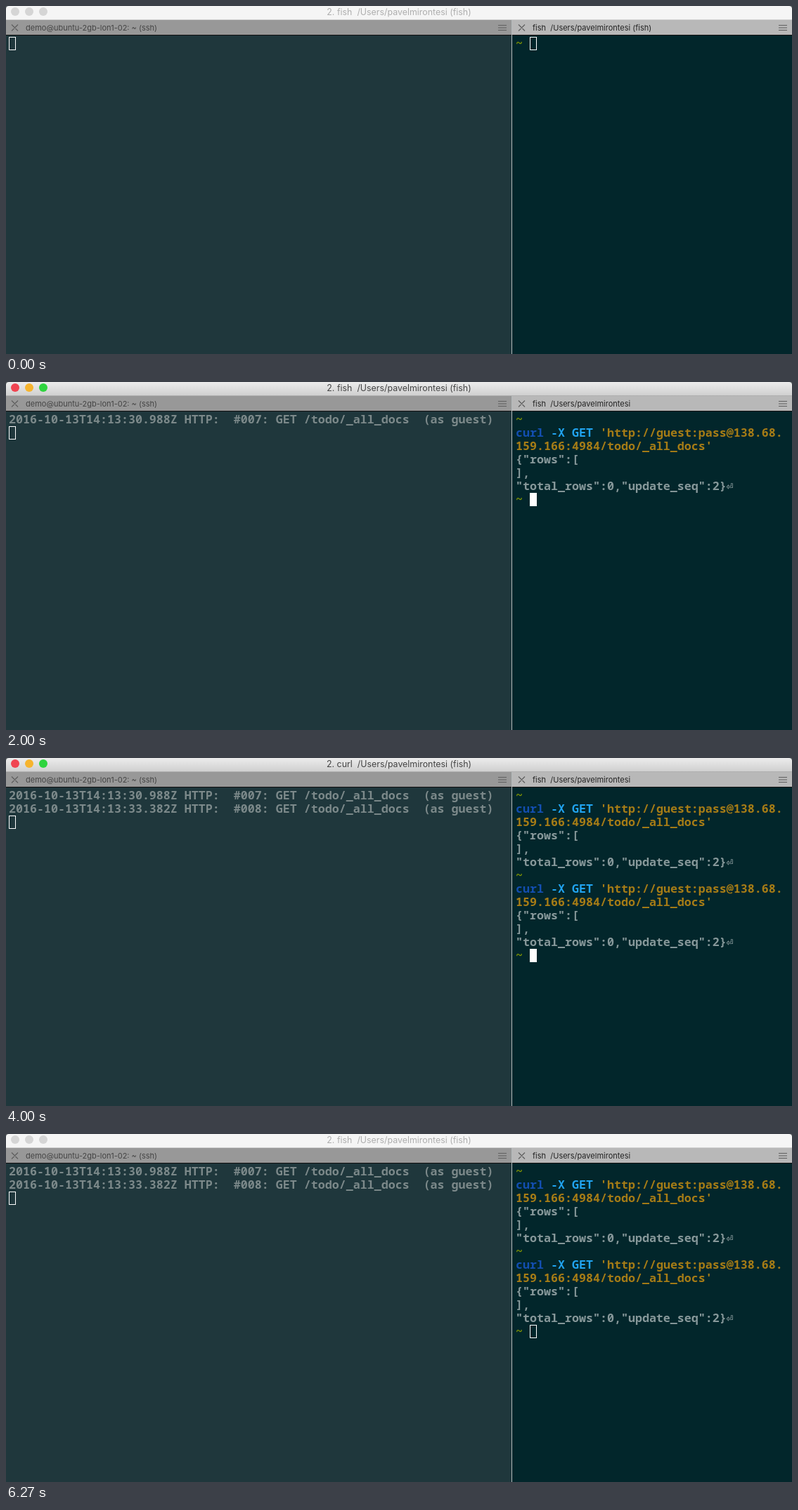
An HTML page for the animation above (6340 ms loop, 1118x496 px).

```html
<!DOCTYPE html>
<html lang="en">
<head>
<meta charset="utf-8">
<title>Terminal</title>
<style>
  html, body { margin: 0; width: 100%; height: 100%; overflow: hidden; background: #555; }
  [hidden] { display: none !important; }
  #stage { position: relative; width: 1118px; height: 496px; overflow: hidden; border-radius: 4px 4px 0 0; background: #02262b; font: 12.4px/18px Inter, sans-serif; }
  #stage div { position: absolute; box-sizing: border-box; }
  .title { inset: 0 0 auto; height: 20px; text-align: center; white-space: pre; color: #aeaeae; background: #f5f5f5; border-bottom: 1px solid #d2d2d2; }
  .focused .title { color: #444; background: linear-gradient(#ececec, #d0d0d0); border-color: #b0b0b0; }
  .title i { position: absolute; top: 2px; width: 12px; height: 12px; border-radius: 50%; background: #d5d5d5; }
  .focused .title i { background: var(--c); }
  .pane { top: 20px; bottom: 0; }
  .left { left: 0; width: 719px; background: #1f373c; color: #7c898a; }
  .right { left: 719px; width: 399px; border-left: 1px solid #b4babb; color: #87989a; }
  .tab { inset: 0 0 auto; height: 22px; padding-left: 28px; font-size: 11px; line-height: 22px; white-space: pre; border-bottom: 1px solid #111; }
  .left .tab { background: #989898; color: #444; }
  .right .tab { background: #b8b8b8; color: #222; padding-left: 29px; }
  .tab svg { position: absolute; top: 0; stroke: #5f5f5f; stroke-width: 1.2; fill: none; }
  pre { position: absolute; top: 23px; left: 4px; margin: 0; font: 600 16.667px/19px "Noto Sans Mono", "DejaVu Sans Mono", monospace; }
  .right pre { left: 5px; }
  .prompt { color: #859900; }
  .cmd { color: #134fb2; }
  .opt { color: #21a4f1; }
  .str { color: #a67c16; }
  .cursor { width: 10px; height: 19px; border: 1px solid #fff; }
  .focused .right .cursor { background: #fff; }
</style>
</head>
<body>
<div id="stage">
  <div class="title"><i style="left:7px;--c:#f04451"></i><i style="left:27px;--c:#f6b42e"></i><i style="left:47px;--c:#2fd43f"></i>2. <span id="job">fish</span>  /Users/pavelmirontesi (fish)</div>
  <div class="pane left">
    <div class="tab">demo@ubuntu-2gb-lon1-02: ~ (ssh)</div>
    <pre id="log"></pre>
    <div class="cursor"></div>
  </div>
  <div class="pane right">
    <div class="tab">fish  /Users/pavelmirontesi<span id="suffix"> (fish)</span></div>
    <pre id="shell"></pre>
    <div class="cursor"></div>
  </div>
</div>
<script>
const LOOP = 6340, FOCUS = [200, 6000];
const runs = [
  { typed: 870, enter: 1530, done: 1600, idle: 1870, stamp: '30.988', id: 7 },
  { typed: 2930, enter: 3800, done: 3930, idle: 4200, stamp: '33.382', id: 8 },
];
const $ = s => document.querySelector(s);
const span = (name, text) => `<span class="${name}">${text}</span>`;
const between = (t, a, b) => t >= a && t < b;

const prompt = span('prompt', '~') + ' ';
const command = '\n' + span('cmd', 'curl') + ' ' + span('opt', '-X GET') + ' ' +
  span('str', "'http://guest:pass@138.68.\n159.166:4984/todo/_all_docs'");
const reply = '\n{"rows":[\n],\n"total_rows":0,"update_seq":2}⏎\n' + prompt;
const logLine = r => `2016-10-13T14:13:${r.stamp}Z HTTP:  #00${r.id}: GET /todo/_all_docs  (as guest)\n`;

function moveCursor(pane, x, col, row) {
  const style = $(pane + ' .cursor').style;
  style.left = x + col * 10 + 'px';
  style.top = 24 + row * 19 + 'px';
}

function setHTML(el, html) {
  if (el.shown !== html) el.innerHTML = el.shown = html;
}

function draw(t) {
  let shell = prompt, log = '', col = 2, row = 0;
  runs.forEach((r, i) => {
    const top = i * 6;
    if (t >= r.typed) { shell += command; [col, row] = [28, top + 2]; }
    if (t >= r.enter) [col, row] = [0, top + 3];
    if (t >= r.done) { shell += reply; log += logLine(r); [col, row] = [2, top + 6]; }
  });
  setHTML($('#shell'), shell);
  setHTML($('#log'), log);
  moveCursor('.right', 5, col, row);
  moveCursor('.left', 4, 0, log.split('\n').length - 1);
  $('#job').textContent = runs.some(r => between(t, r.done, r.idle)) ? 'curl' : 'fish';
  $('#suffix').hidden = t >= runs[0].done;
  $('#stage').classList.toggle('focused', between(t, ...FOCUS));
}

document.querySelectorAll('.tab').forEach(tab => {
  const width = tab.offsetWidth, x = tab.closest('.left') ? 8 : 9;
  tab.insertAdjacentHTML('beforeend', `<svg style="left:0" width="${width}" height="22">
    <path d="M${x} 6.5l9 9m0-9l-9 9M${width - 19} 7.5h12m-12 3.5h12m-12 3.5h12"/></svg>`);
});

function tick(now) {
  draw(now % LOOP);
  requestAnimationFrame(tick);
}
draw(0);
requestAnimationFrame(tick);
</script>
</body>
</html>
```
